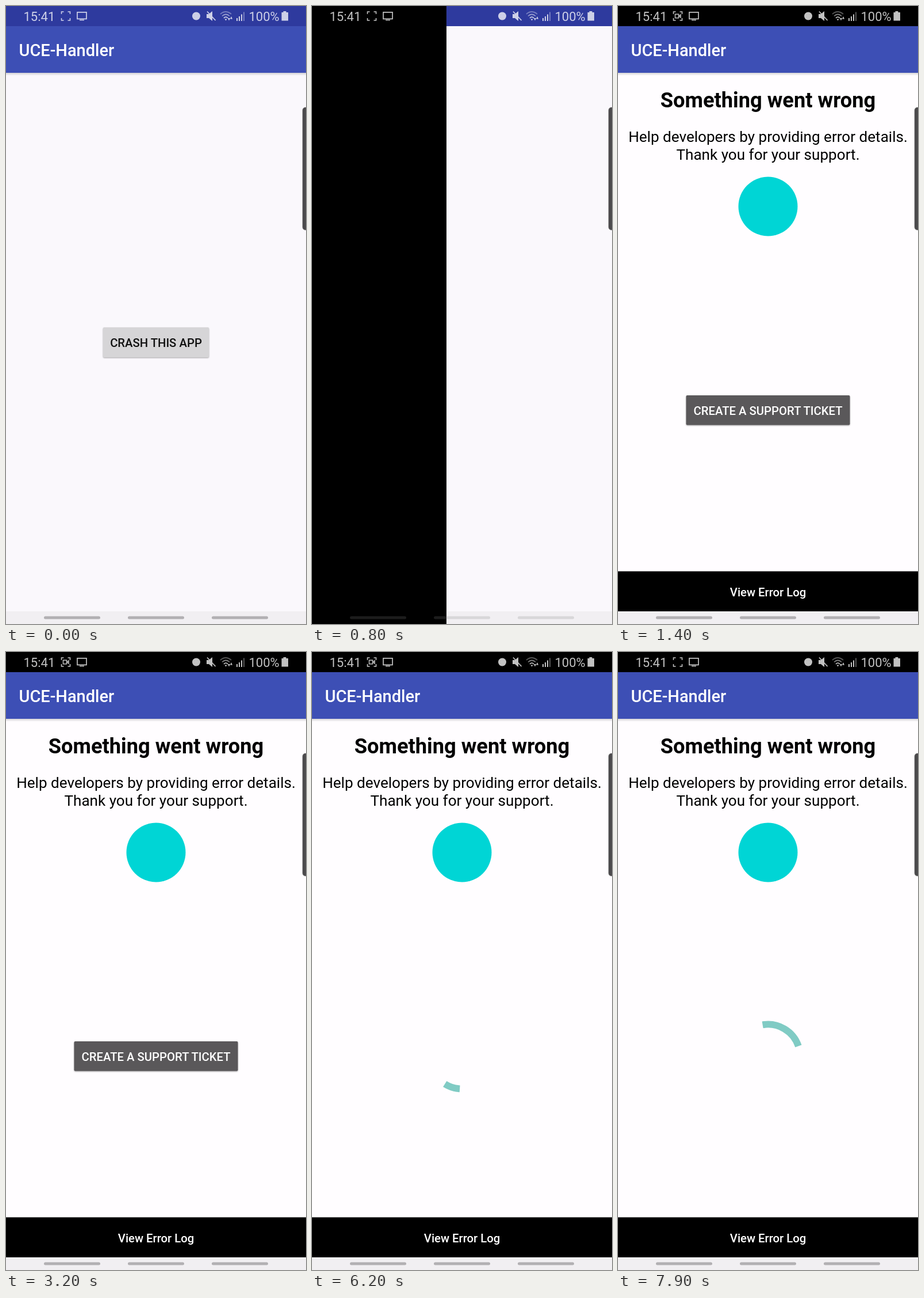
Write an HTML page that moves like this. It is 522 px wide and 1073 px high and loops after 8000 ms.

```html
<!DOCTYPE html>
<html lang="en">
<head>
<meta charset="utf-8">
<title>Crash handler demo</title>
<style>
html, body { margin: 0; width: 100%; height: 100%; overflow: hidden; background: #000; }
svg { display: block; width: 100vw; height: 100vh; font-family: Roboto, sans-serif; }
text { white-space: pre; }
.medium { font-weight: 500; }
.mid { text-anchor: middle; }
.button { filter: drop-shadow(0 1.5px 1.2px rgba(0, 0, 0, .35)); }
.line { fill: none; stroke: #fff; }
</style>
</head>
<body>
<svg viewBox="0 0 522 1073">
  <defs>
    <linearGradient id="shade" x2="0" y2="1">
      <stop stop-color="#000" stop-opacity=".16"/>
      <stop offset="1" stop-color="#000" stop-opacity="0"/>
    </linearGradient>
    <clipPath id="crashClip"><rect x="169" y="558" width="184" height="52" rx="2"/></clipPath>
    <clipPath id="ticketClip"><rect x="118.500" y="676" width="285" height="51.500" rx="2"/></clipPath>
    <g id="toolbar">
      <rect y="116" width="522" height="5" fill="url(#shade)"/>
      <rect y="35" width="522" height="81" fill="#3d4fb5"/>
      <text class="medium" x="22.500" y="87" font-size="29" fill="#fff">UCE-Handler</text>
    </g>
  </defs>

  <rect width="522" height="1073"/>

  <g id="home">
    <rect width="522" height="1073" fill="#faf8fc"/>
    <rect width="522" height="35" fill="#2e3a9e"/>
    <use href="#toolbar"/>
    <rect class="button" x="169" y="558" width="184" height="52" rx="2" fill="#d6d5d7"/>
    <circle id="crashRipple" cx="261" cy="584" clip-path="url(#crashClip)" fill="#000" opacity=".14"/>
    <text class="medium mid" x="261" y="592" font-size="20.300" fill="#111">CRASH THIS APP</text>
    <rect y="1051" width="522" height="22" fill="#f1eff2"/>
  </g>

  <g id="blank">
    <rect width="522" height="1073" fill="#faf8fc"/>
    <rect width="522" height="35" fill="#2e3a9e"/>
    <rect y="1051" width="522" height="22" fill="#f1eff2"/>
  </g>

  <g id="error">
    <rect width="522" height="1073" fill="#fffdff"/>
    <rect width="522" height="35"/>
    <use href="#toolbar"/>
    <text class="mid" x="261" y="176" font-size="36.250" font-weight="700">Something went wrong</text>
    <g class="mid" font-size="26.100">
      <text x="261" y="236">Help developers by providing error details.</text>
      <text x="261" y="267">Thank you for your support.</text>
    </g>
    <circle cx="261" cy="348" r="51.500" fill="#00d5d5"/>
    <g id="ticket">
      <rect class="button" x="118.500" y="676" width="285" height="51.500" rx="2" fill="#5a585a"/>
      <circle id="ticketRipple" cx="261" cy="702" clip-path="url(#ticketClip)" fill="#fff" opacity=".2"/>
      <text class="medium mid" x="261" y="710" font-size="20.300" fill="#fff">CREATE A SUPPORT TICKET</text>
    </g>
    <path id="spinner" fill="none" stroke="#80cbc4" stroke-width="11.800"/>
    <rect y="981.500" width="522" height="70"/>
    <text class="medium mid" x="261" y="1025" font-size="20.300" fill="#fff">View Error Log</text>
    <rect y="1051" width="522" height="22" fill="#f1eff2"/>
  </g>

  <path id="handles" d="M68.500 1062h93M214.500 1062h93M360.500 1062h93" stroke-width="5" stroke-linecap="round"/>

  <g id="status" fill="#fff" opacity=".76" font-size="22">
    <text x="30.500" y="25.500">15:41</text>
    <text x="422.500" y="25.500">100%</text>
    <path class="line" stroke-width="1.600" d="M96.500 14v-4h4M107.500 10h4v4M111.500 21v4h-4M100.500 25h-4v-4"/>
    <path id="camera" class="line" stroke-width="1.500" d="M99.500 14.200h6v6.600h-6zM106 17.500l3-2.500v5z"/>
    <path class="line" stroke-width="1.700" d="M124 10.800h16v11.500h-16zM128 24.500h8"/>
    <circle cx="331" cy="17.500" r="7"/>
    <path d="M349 14h4l6-5v17l-6-5h-4z"/>
    <path class="line" stroke-width="1.800" d="M350 9.500L364.500 25"/>
    <g class="line" stroke-width="1.700">
      <path d="M373 14q9-8 19 0" opacity=".45"/>
      <path d="M376 17.500q6.500-6 13 0" opacity=".65"/>
      <path d="M379 20.800q3.500-3.500 7 0"/>
    </g>
    <path d="M380.500 22.500h4l-2 3zM386 21h4l-2 4.500zM390 22.500l2-4.500 2 4.500z"/>
    <path d="M401 21h2v5h-2zM405 18h2v8h-2zM409 14.500h2v11.500h-2z"/>
    <path d="M413 10.500h2v15.500h-2z" opacity=".45"/>
    <path d="M479.500 11h3v-2h5v2h3.500v14.500h-11.500z"/>
  </g>

  <rect x="516" y="176" width="16" height="213" rx="5" fill="#4b4a4c" stroke="#777578" stroke-width=".6"/>
</svg>
<script>
const LOOP = 8000, STEP = 100;
const $ = id => document.getElementById(id);
const show = (id, on) => $(id).style.display = on ? '' : 'none';
const clamp = x => Math.max(0, Math.min(1, x));

// Solves the x of a Bezier segment by bisection and returns its y (0 to 1).
function ease(x, x0, x1, x2, x3) {
  let lo = 0, hi = 1, u;
  for (let i = 0; i < 24; i++) {
    u = (lo + hi) / 2;
    const v = 1 - u;
    const px = x0 * v * v * v + 3 * x1 * u * v * v + 3 * x2 * u * u * v + x3 * u * u * u;
    if (px < x) lo = u; else hi = u;
  }
  return u * u * (3 - 2 * u);
}

const mix = (t, a, b, y0, y1) => y0 + (y1 - y0) * (t - a) / (b - a);

function point(deg) {
  const a = deg * Math.PI / 180;
  return (261 + 56 * Math.sin(a)).toFixed(2) + ' ' + (702.5 - 56 * Math.cos(a)).toFixed(2);
}

function spinnerPath(t) {
  const early = t < 6200;
  const age = Math.max(0, early ? mix(t, 5100, 6200, 91, 1084) : mix(t, 6200, 7900, 1084, 2849));
  const spin = early ? mix(t, 5100, 6200, -6, 229) : mix(t, 6200, 7900, 229, 698);
  const p = age / 1333 % 1;
  const head = p < .5 ? ease(p, 0, .2, .1, .5) : 1;
  const tail = p > .5 ? ease(p, .5, .7, .6, 1) : 0;
  const from = spin + 90 * p + 270 * tail;
  const sweep = Math.max(3.6, 270 * (head - tail));
  return `M${point(from)}A56 56 0 ${sweep > 180 ? 1 : 0} 1 ${point(from + sweep)}`;
}

function draw(t) {
  show('home', t < 500);
  $('home').setAttribute('opacity', 1 - clamp((t - 200) / 300));
  $('crashRipple').setAttribute('r', 110 * clamp(t / 200));

  show('blank', t >= 700 && t < 1200);
  const x = 522 * (1 - clamp((t - 650) / 500)) ** 2.25;
  $('blank').setAttribute('transform', `translate(${x} 0)`);

  show('error', t >= 1200);
  show('ticket', t < 5100);
  $('ticketRipple').setAttribute('r', 160 * clamp((t - 4800) / 200));
  show('spinner', t >= 5100);
  if (t >= 5100) $('spinner').setAttribute('d', spinnerPath(t));

  const dark = t >= 400 && t < 1200;
  $('handles').setAttribute('stroke', dark ? 'rgba(128,128,128,.22)' : '#b2b0b3');
  show('camera', Math.floor((t + 300) / 500) % 2);
}

const start = performance.now();
function tick() {
  const t = (performance.now() - start) % LOOP;
  draw(Math.floor(t / STEP) * STEP);
  requestAnimationFrame(tick);
}
tick();
</script>
</body>
</html>
```
